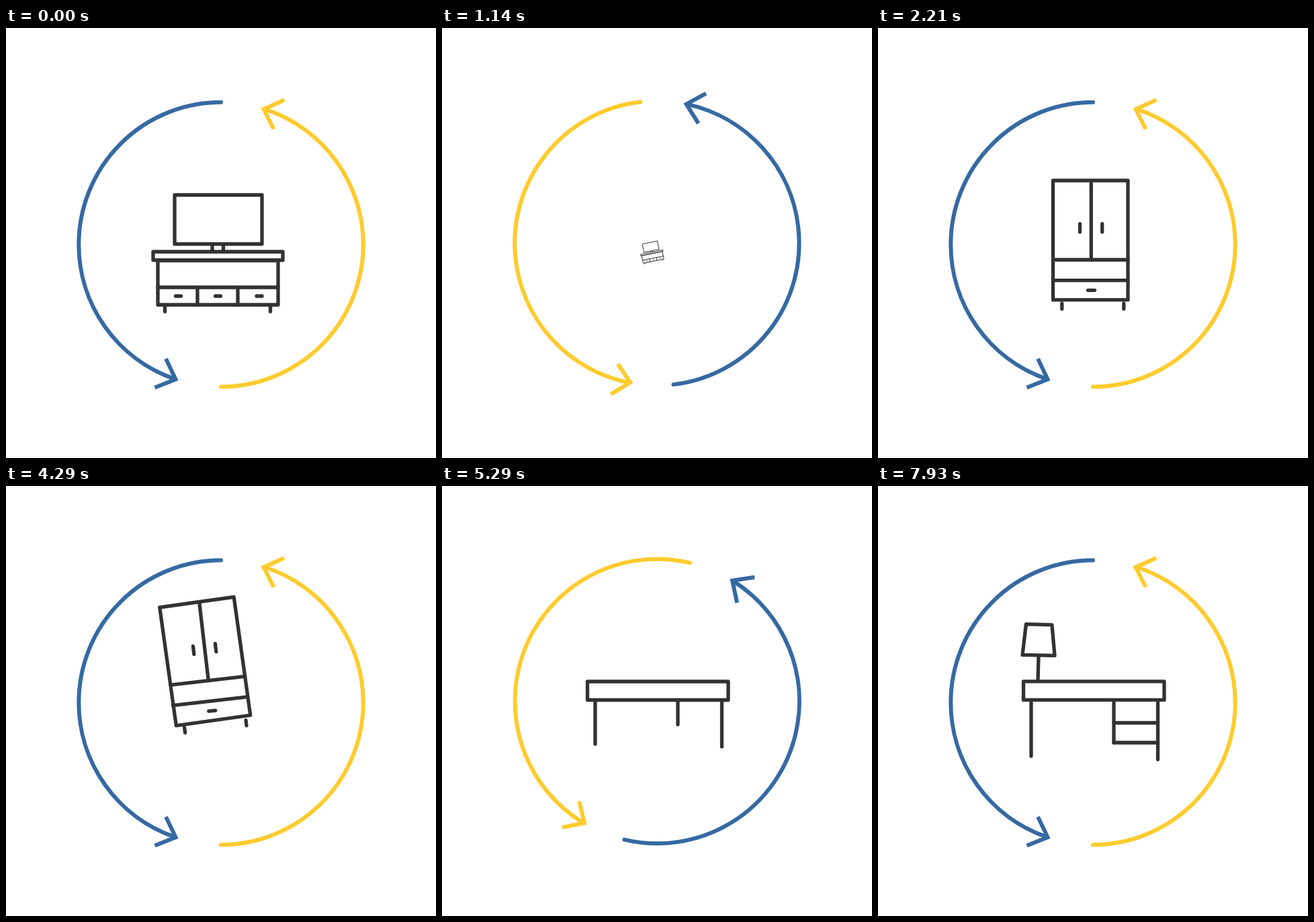
An HTML page with a canvas for the animation above (8000 ms loop, 640x640 px).

```html
<!DOCTYPE html>
<html lang="en">
<head>
<meta charset="utf-8">
<title>Furniture cycle</title>
<style>
html, body { margin: 0; width: 100%; height: 100%; overflow: hidden; background: #fff; }
canvas { display: block; width: 100%; height: 100%; }
</style>
</head>
<body>
<canvas id="stage" width="640" height="640"></canvas>
<script>
const ctx = document.getElementById('stage').getContext('2d');
const INK = '#333132', BLUE = '#3669a2', YELLOW = '#ffcb2e';
const LOOP = 8000, SHOTS = 112;   // 14 pictures a second
const SPIN = 54;                  // frames per turn of the arrows
const SECOND_TURN = 107;          // frame where the second turn begins
const rad = deg => deg * Math.PI / 180;

// Eased value at n through [frame, value] stops.
function key(n, ...stops) {
  if (n <= stops[0][0]) return stops[0][1];
  for (let i = 1; i < stops.length; i++) {
    const [a, from] = stops[i - 1], [b, to] = stops[i];
    if (n < b) {
      const p = (n - a) / (b - a);
      return from + (to - from) * p * p * (3 - 2 * p);
    }
  }
  return stops[stops.length - 1][1];
}

function line(...pts) {
  ctx.beginPath();
  for (let i = 0; i < pts.length; i += 2) ctx.lineTo(pts[i], pts[i + 1]);
  ctx.stroke();
}

function box(x1, y1, x2, y2) {
  ctx.strokeRect(x1, y1, x2 - x1, y2 - y1);
}

function group(draw) {
  ctx.save();
  draw();
  ctx.restore();
}

function about(x, y, deg, scale = 1) {
  ctx.translate(x, y);
  ctx.rotate(rad(deg));
  ctx.scale(scale, scale);
  ctx.translate(-x, -y);
}

function arrow(color, from, to, head) {
  ctx.strokeStyle = color;
  ctx.lineWidth = 6;
  ctx.lineCap = 'round';
  ctx.beginPath();
  ctx.arc(0, 0.95, 211.7, from, to, true);
  ctx.stroke();
  ctx.lineCap = 'butt';
  ctx.lineJoin = 'miter';
  line(...head);
}

function arrows(n) {
  const turn = n < SECOND_TURN ? n : n - SECOND_TURN;
  group(() => {
    ctx.translate(320, 321.3);
    ctx.rotate(-2 * Math.PI * Math.min(turn / SPIN, 1));
    arrow(BLUE, -Math.PI / 2, 1.91, [-82, 171, -67.5, 201.5, -98.5, 214]);
    arrow(YELLOW, Math.PI / 2, -1.25, [94.3, -214.3, 63.5, -200.3, 78.5, -170.8]);
  });
}

// Tips over its left foot, hops up and shrinks away.
function leave(e, px, py, cx, cy, draw) {
  if (e >= 30) return;
  group(() => {
    const up = key(e, [17, 0], [21, 1], [30, 0.2]);
    about(cx, cy, 0, key(e, [22, 1], [30, 0.02]));
    ctx.translate(-5 * up, -49 * up);
    about(px, py, key(e, [4, 0], [17, -3.95], [21, -7.95], [30, -12]));
    draw();
  });
}

function television() {
  box(251, 248.5, 381, 321.5);
  line(307, 322, 307, 332);
  line(323.5, 322, 323.5, 332);
  box(219, 333, 412, 345.5);
  box(226, 346, 405, 412);
  line(226, 386, 405, 386);
  for (const x of [285, 345]) line(x, 386, x, 412);
  for (const x of [256.5, 315.5, 377]) line(x - 4, 399, x + 4, 399);
  for (const x of [236.5, 393.5]) line(x, 413, x, 422);
}

function wardrobe(lag = 0) {
  box(260.5, 227, 372, 404.7);
  about(316.5, 345, lag);
  line(260.5, 345, 372, 345);
  line(260.5, 375.7, 372, 375.7);
  line(317.3, 228, 317.3, 345);
  for (const x of [300.5, 333.7]) line(x, 291.5, x, 303.5);
  line(312.5, 390.3, 322.5, 390.3);
  for (const x of [273.8, 365.8]) line(x, 410, x, 418);
}

function buildWardrobe(n) {
  const to = (start, seen, end) => key(n, [31, start], [40, seen], [48, end]);
  if (n < 32) return;
  if (n >= 48) return group(() => wardrobe());
  box(to(316, 257.5, 260.5), to(320, 235, 227), to(316, 375.5, 372), to(322, 380, 404.7));
  line(to(316, 262.5, 260.5), 345, to(316, 370, 372), 345);
  if (n < 36) return;
  line(260.5, 376, 372, 376);
  line(to(315, 315, 317.3), to(302, 288.5, 228), to(315, 315, 317.3), to(302, 315.5, 345));
  for (const [x, end] of [[306.5, 300.5], [323.5, 333.7]]) {
    const hx = to(315, x, end);
    line(hx, to(298, 293, 291.5), hx, to(298, 304, 303.5));
  }
  const half = to(0, 32, 55.5), base = to(412, 407.7, 404.7);
  ctx.lineCap = 'butt';
  line(315 - half, base, 315 + half, base);
  ctx.lineCap = 'round';
  const pull = to(352, 352, 317.5), pullHalf = to(0, 0.4, 5);
  line(pull - pullHalf, 390, pull + pullHalf, 390);
  if (n < 43) line(276, 372.5, 276, 374);
  for (const [x, end] of [[256.5, 273.8], [375, 365.8]]) {
    const lx = to(x, x, end);
    line(lx, to(436, 435.9, 410), lx, to(436, 436.1, 418));
  }
}

function desk(n) {
  if (n < 121) return;
  const grow = key(n, [120, 0], [127, 1.04], [131, 1]);
  const since = Math.max(0, n - 153);
  const wobble = 0.6 * Math.exp(-since / 22) * Math.sin(since / 4);
  ctx.translate(0, key(n, [135, 0], [146, -6.5], [153, -5.7], [167, 0]));

  if (n > 127) {
    const leg = (x, seen, end) => line(x, 319, x, key(n, [127, 319], [132, seen], [140, end]));
    leg(228, 384, 402);
    leg(351, 355, 382);
    leg(416.5, 388, 407);
  }
  const shelf = key(n, [134, 351], [142, 416.5]);
  if (shelf > 351) {
    line(351, 352.5, shelf, 352.5);
    line(351, 382, shelf, 382);
  }

  ctx.translate(0, wobble);
  box(321.25 - 104.75 * grow, 304.75 - 13.75 * grow, 321.25 + 104.75 * grow, 304.75 + 13.75 * grow);
  const rod = key(n, [133, 0], [140, 1]);
  if (rod) line(238, 290, 238 + rod, 290 - 37 * rod);
  const shade = key(n, [137, 0], [143, 1.08], [148, 1]);
  if (shade) {
    about(239, 252, wobble * 1.5, shade);
    ctx.beginPath();
    ctx.moveTo(220.5, 205.7);
    ctx.lineTo(259, 206.7);
    ctx.lineTo(263, 252.5);
    ctx.lineTo(215, 251.5);
    ctx.closePath();
    ctx.stroke();
  }
}

function draw(time) {
  const shot = Math.min(SHOTS - 1, Math.floor((time + 5) * SHOTS / LOOP));
  const n = Math.max(0, Math.floor(shot * 25 / 14 - 0.1));
  ctx.fillStyle = '#fff';
  ctx.fillRect(0, 0, 640, 640);
  arrows(n);
  ctx.strokeStyle = INK;
  ctx.lineWidth = 5.3;
  ctx.lineCap = ctx.lineJoin = 'round';
  if (n < SECOND_TURN) {
    leave(n, 230, 421, 316, 340, television);
    buildWardrobe(n);
  } else {
    leave(n - SECOND_TURN + 21, 266, 421, 316, 340, () => wardrobe(1.3));
    group(() => desk(n));
  }
}

const start = performance.now();
function tick() {
  draw((performance.now() - start) % LOOP);
  requestAnimationFrame(tick);
}
tick();
</script>
</body>
</html>
```
